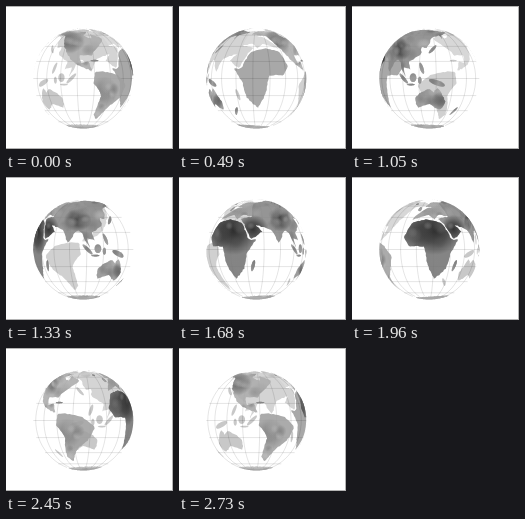
Animation of 167 by 143 pixels, one loop 2.8 s. Source, as an HTML page with a canvas:

```html
<!DOCTYPE html>
<html lang="en">
<head>
<meta charset="utf-8">
<title>Turning globe</title>
<style>
html, body { margin: 0; width: 100%; height: 100%; overflow: hidden; background: #fff; }
canvas { display: block; width: 167px; height: 143px; }
</style>
</head>
<body>
<canvas id="stage"></canvas>
<script>
const W = 167, H = 143, CX = 77.3, CY = 72.5, R = 50;
const LOOP = 2800, STEP = 70, START = -93, RAD = Math.PI / 180;

const canvas = document.getElementById('stage');
const ctx = canvas.getContext('2d');
const dpr = window.devicePixelRatio || 1;
canvas.width = W * dpr;
canvas.height = H * dpr;

let seed = 11;
const random = () => (seed = seed * 16807 % 2147483647) / 2147483647;
const spread = amount => (random() * 2 - 1) * amount;
const grey = (v, a = 1) => `rgba(${v},${v},${v},${a})`;

// Smooth closed coast through a few longitude, latitude pairs, slightly ragged.
function coast(keys) {
  const n = keys.length / 2, out = [];
  const at = (i, axis) => keys[(i + n) % n * 2 + axis];
  const curve = (i, t, axis) => {
    const [a, b, c, d] = [-1, 0, 1, 2].map(k => at(i + k, axis));
    return b + .25 * t * (c - a + t * (2 * a - 5 * b + 4 * c - d + t * (3 * (b - c) + d - a)))
      + .5 * (c - b) * t;
  };
  for (let i = 0; i < n; i++) {
    const length = Math.hypot(at(i + 1, 0) - at(i, 0), at(i + 1, 1) - at(i, 1));
    const parts = Math.ceil(length / 3);
    for (let k = 0; k < parts; k++) {
      out.push([curve(i, k / parts, 0) + spread(.7), curve(i, k / parts, 1) + spread(.7)]);
    }
  }
  return out;
}

function oval(lon, lat, rx, ry, tilt = 0) {
  return Array.from({ length: 24 }, (_, i) => {
    const a = i * 15 * RAD, x = rx * Math.cos(a), y = ry * Math.sin(a), t = tilt * RAD;
    return [lon + x * Math.cos(t) - y * Math.sin(t), lat + x * Math.sin(t) + y * Math.cos(t)];
  });
}

const polarCoast = Array.from({ length: 120 }, (_, i) =>
  [i * 3, -71 + 4 * Math.cos((i * 3 - 95) * RAD) + spread(.7)]);

// Each land: outline, near tone, far tone, broad spots [lon, lat, radius, tone].
const lands = [
  [coast([-9,37, -3,46, 10,55, 22,58, 7,59, 24,71, 48,68, 46,42, 30,44, 22,37, 14,43, 0,40]),
    155, 218, []],
  [coast([44,67, 104,77, 185,68, 160,60, 157,52, 154,59, 137,54, 128,38, 120,39, 121,29, 107,20,
    109,11, 100,13, 103,2, 93,21, 86,20, 78,8, 70,23, 50,29, 58,21, 45,13, 35,30, 28,38, 44,42]),
    135, 212, [[47,24,18,25], [88,36,16,35]]],
  [coast([-16,14, -9,31, 10,37, 32,31, 42,12, 51,12, 40,-5, 36,-22, 22,-35, 13,-18, 9,3, -8,4]),
    115, 168, [[22,22,30,25], [0,20,22,60]]],
  [coast([-166,62, -150,71, -85,69, -93,59, -78,53, -76,62, -56,52, -80,32, -82,27, -97,28, -95,18,
    -87,20, -83,9, -105,19, -124,42, -135,58]), 172, 215, [[-118,48,20,85]]],
  [coast([-78,8, -52,5, -35,-7, -41,-22, -57,-36, -67,-54, -75,-46, -71,-19, -81,-5]),
    160, 208, [[-68,-15,18,125]]],
  [coast([114,-23, 130,-12, 137,-16, 142,-11, 153,-27, 147,-39, 132,-31, 116,-35]),
    145, 200, [[147,-26,11,85]]],
  [oval(-42, 71, 17, 11), 205, 230, []],
  [oval(-93, 74, 24, 4), 190, 225, []],
  [polarCoast, 165, 190, []],
  ...[[113,1,4,5], [101,0,8,2,-45], [110,-7,5,1], [141,-5,10,3,-20], [121,-2,2,4], [123,12,2,7,20],
    [137,36,8,2,45], [47,-19,2,7,-15], [172,-41,2,7,-35], [-3,54,3,4], [-19,65,4,2], [-79,21,5,1]]
    .map(o => [oval(...o), 135, 200, []])
];

// Relief: seeded dabs lighter and darker than the land around them.
for (const [points, tone, , spots] of lands) {
  const pick = () => points[Math.floor(random() * points.length)];
  for (let i = 0; i < points.length / 6; i++) {
    const [a, b] = [pick(), pick()];
    spots.push([(a[0] + b[0]) / 2, (a[1] + b[1]) / 2, 4 + random() * 6,
      Math.round(tone + spread(55)), .5]);
  }
}

function project(lon, lat, center) {
  const d = (lon - center) * RAD, c = Math.cos(lat * RAD);
  return { x: R * c * Math.sin(d), y: -R * Math.sin(lat * RAD), z: c * Math.cos(d) };
}

// Points beyond the horizon slide out to the rim of the disc.
function trace(points, center, side) {
  const list = points.map(([lon, lat]) => project(lon, lat, center));
  if (!list.some(p => p.z * side > 0)) return false;
  let last = null;
  ctx.beginPath();
  for (const p of list) {
    if (p.z * side >= 0) {
      ctx.lineTo(p.x, p.y);
      last = null;
    } else {
      const a = Math.atan2(p.y, p.x);
      if (last === null) ctx.lineTo(R * Math.cos(a), R * Math.sin(a));
      else ctx.arc(0, 0, R, last, a, Math.sin(a - last) < 0);
      last = a;
    }
  }
  ctx.closePath();
  return true;
}

function drawSpot([lon, lat, size, tone, alpha = .9], center) {
  const p = project(lon, lat, center);
  if (p.z < -.2) return;
  const r = R * size * RAD;
  const g = ctx.createRadialGradient(0, 0, 0, 0, 0, r);
  g.addColorStop(0, grey(tone, alpha));
  g.addColorStop(.5, grey(tone, alpha * .65));
  g.addColorStop(1, grey(tone, 0));
  ctx.save();
  ctx.translate(p.x, p.y);
  ctx.scale(Math.max(.18, Math.abs(Math.cos((lon - center) * RAD))), Math.cos(lat * RAD));
  ctx.fillStyle = g;
  ctx.fillRect(-r, -r, 2 * r, 2 * r);
  ctx.restore();
}

function drawFar(center) {
  for (const [points, , tone] of lands) {
    if (!trace(points, center, -1)) continue;
    ctx.fillStyle = grey(tone);
    ctx.fill();
  }
}

function drawNear(center) {
  ctx.globalAlpha = .88;
  for (const [points, tone, , spots] of lands) {
    if (!trace(points, center, 1)) continue;
    ctx.fillStyle = grey(tone);
    ctx.fill();
    ctx.save();
    ctx.clip();
    for (const s of spots) drawSpot(s, center);
    ctx.restore();
  }
  ctx.globalAlpha = 1;
}

function drawGrid(center) {
  ctx.lineWidth = .55;
  ctx.strokeStyle = grey(0, .2);
  ctx.beginPath();
  for (let lat = -60; lat <= 60; lat += 20) {
    const p = project(center + 90, lat, center);
    ctx.moveTo(-p.x, p.y);
    ctx.lineTo(p.x, p.y);
  }
  for (let lon = 0; lon < 360; lon += 20) {
    if (project(lon, 0, center).z < .15) continue;
    for (let lat = -70; lat <= 70; lat += 5) {
      const p = project(lon, lat, center);
      if (lat === -70) ctx.moveTo(p.x, p.y);
      else ctx.lineTo(p.x, p.y);
    }
  }
  ctx.stroke();
}

function drawFrame() {
  ctx.fillStyle = '#fff';
  ctx.fillRect(0, 0, W, H);
  ctx.fillStyle = '#b4b4b4';
  ctx.fillRect(0, 0, W, 1);
  ctx.fillRect(0, H - 1, W, 1);
  ctx.fillRect(W - 1, 0, 1, H);
}

function draw(step) {
  const center = START - 360 * step * STEP / LOOP;
  ctx.setTransform(dpr, 0, 0, dpr, 0, 0);
  drawFrame();
  ctx.translate(CX, CY);
  drawFar(center);
  drawGrid(center);
  drawNear(center);
}

const begin = performance.now();
let shown = -1;
function tick() {
  const step = Math.floor((performance.now() - begin) % LOOP / STEP);
  if (step !== shown) draw(shown = step);
  requestAnimationFrame(tick);
}
tick();
</script>
</body>
</html>
```
